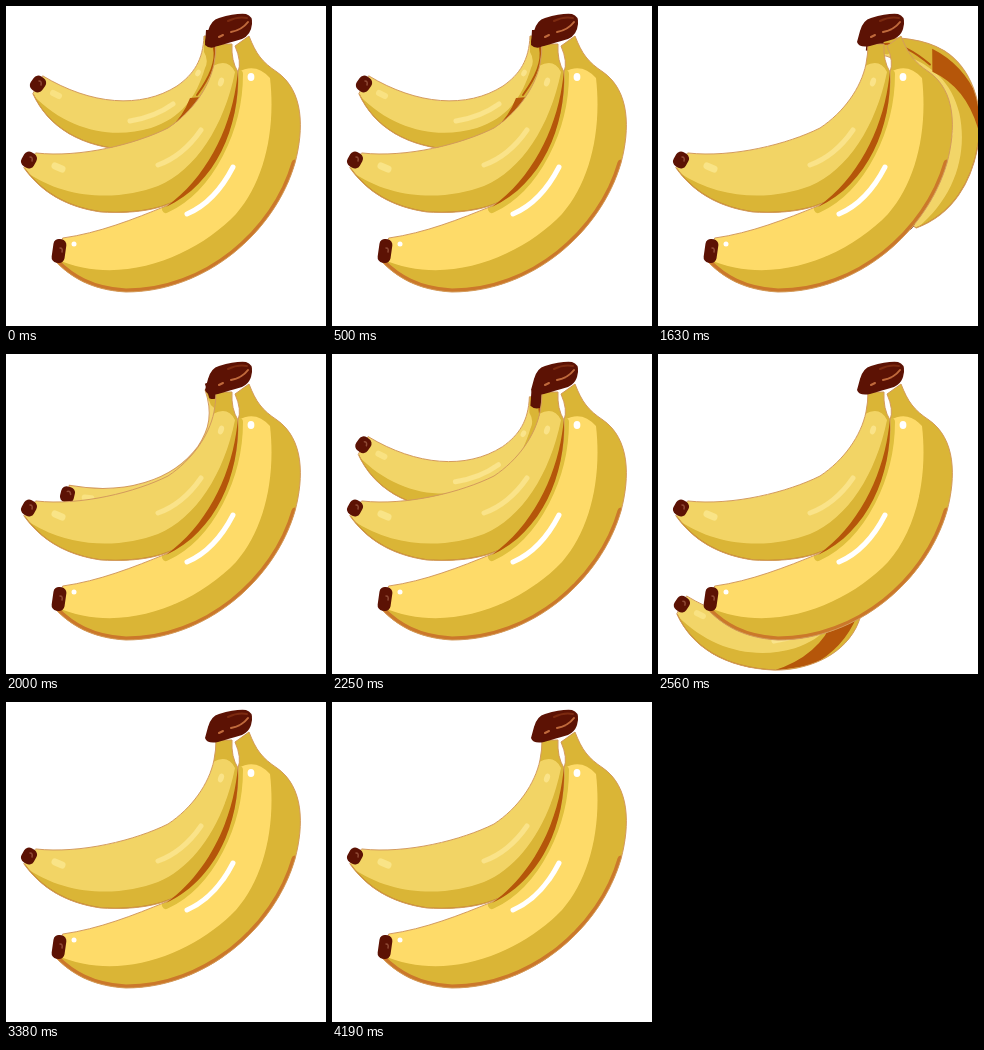
An HTML page for the animation above (4250 ms loop, 320 by 320 pixels).

```html
<!DOCTYPE html>
<html lang="en">
<head>
<meta charset="utf-8">
<title>Bananas</title>
<style>
html, body { margin: 0; width: 100%; height: 100%; overflow: hidden; background: #fff; }
svg { display: block; width: 100%; height: 100%; }
path { fill: none; stroke-linecap: round; }
</style>
</head>
<body>
<svg id="stage" viewBox="0 0 320 320"></svg>
<script>
const GOLD = '#dab536', BROWN = '#b5560a', DARK = '#5c1204';

const line = (d, color, width) => `<path d="${d}" style="stroke:${color};stroke-width:${width}"/>`;
const area = (d, color) => `<path d="${d}" style="fill:${color}"/>`;
const dot = (x, y, rx, ry, color, turn = 0) =>
  `<ellipse cx="${x}" cy="${y}" rx="${rx}" ry="${ry}" fill="${color}" transform="rotate(${turn} ${x} ${y})"/>`;

const tip = (x, y, w, h, turn) =>
  `<rect x="${x - w / 2}" y="${y - h / 2}" width="${w}" height="${h}" rx="5.5" fill="${DARK}" transform="rotate(${turn} ${x} ${y})"/>` +
  line(`M${x + 1} ${y - 3}Q${x + 4} ${y - 3} ${x + 3} ${y + 1}`, '#8f4a35', 1.5);

// A body with its shaded underside and details clipped to the outline
const banana = (id, outline, light, shade, inside, over) =>
  `<g id="${id}"><clipPath id="${id}Clip"><path d="${outline}"/></clipPath>
  <g clip-path="url(#${id}Clip)">${area(outline, light)}${area(shade, GOLD)}${inside}</g>
  ${line(outline, '#d39a5c', 1)}${over}</g>`;

const back = banana('back',
  'M37 70C85 99 135 103 171 80C188 68 197 54 198 30L213 30C216 55 217 80 206 102C190 132 155 144 125 144C75 142 42 121 27 88Z',
  '#f2d568',
  'M26 88C60 124 105 134 145 122C175 112 190 92 199 62Q203 54 198 46V30H230V160H20Z',
  area('M184 92L207 90Q194 122 162 139L122 145Q170 130 184 92Z', BROWN) +
  line('M125 144C75 142 42 121 27 88', '#c58a2c', 1.5),
  line('M208 42Q212 60 191 89', BROWN, 2) +
  line('M124 115Q149 111 167 98', '#fae48b', 5) +
  line('M47 87L53 90', '#f9e282', 6) +
  dot(192, 67, 2.5, 3.5, '#fae48b', 30) +
  area('M200 24L214 24L212 40Q204 44 199 39Z', DARK) +
  tip(32, 78, 14, 16, 35));

const middle = banana('middle',
  'M30 147C75 152 130 138 162 122C186 106 203 82 208 58Q210 48 210 38L226 38Q225 55 232 66C236 120 215 165 190 182C165 204 130 208 95 206C60 201 35 186 18 162Z',
  '#f2d465',
  'M16 163C60 196 115 194 152 180C190 164 218 120 229 66Q222 52 207 60L200 30H245V220H10Z',
  line('M190 182C165 204 130 208 95 206C60 201 35 186 18 162', '#c58a2c', 1.5),
  line('M152 159Q177 150 195 124', '#fae389', 5) +
  line('M49 160L56 163', '#f9e487', 7) +
  dot(215, 76, 2.8, 4.5, '#fae389', 20) +
  tip(23, 154, 14, 16, 30));

const front = banana('front',
  'M57 232C93 227 128 213 160 200C205 180 234 120 232 66Q236 56 229 40L243 30C250 48 256 56 271 66C298 85 298 123 289 157C269 226 200 286 120 286C85 284 65 271 50 256Z',
  '#fedb69',
  'M50 253C115 282 190 250 230 208C258 176 270 125 264 72Q250 56 232 66L220 25H310V300H40Z',
  line('M160 203C205 182 233 122 233 68', '#e0bf3c', 8) +
  line('M289 157C269 226 200 286 120 286C85 284 65 271 50 256', '#cb782a', 7),
  area('M232 66C234 120 210 178 160 201C200 172 223 125 230 80Z', BROWN) +
  line('M181 208Q209 196 227 161', '#fff', 5) +
  dot(245, 71, 3.4, 4, '#fff') + dot(68, 238, 2.5, 2.5, '#fff') +
  tip(53, 245, 13, 24, 8));

const crown =
  area('M199 36L202 25Q205 14 213 12Q230 7 240 8Q247 10 246 18Q245 29 236 33Q222 37 212 40Q201 42 199 36Z', DARK) +
  line('M213 31L217 29', '#c06a3c', 2) +
  line('M225 26Q236 24 242 16', '#c06a3c', 2) +
  line('M222 15Q232 10 241 12', '#7c2a10', 2);

document.getElementById('stage').innerHTML = back + middle + front + crown;
const mover = document.getElementById('back');

const LOOP = 4250, STEP = 62.5;
const SWING_MID = 1525, SWING_HALF = 700, SWING_ANGLE = 90;
const FALL_START = SWING_MID + SWING_HALF;

function draw(now) {
  const t = Math.floor((now % LOOP + 4) / STEP) * STEP;
  const phase = Math.min(1, Math.abs(t - SWING_MID) / SWING_HALF);
  const angle = -SWING_ANGLE * (1 + Math.cos(Math.PI * phase)) / 2;
  const fall = Math.max(0, t - FALL_START);
  mover.setAttribute('transform',
    `translate(${-0.024 * fall} ${0.51 * fall}) rotate(${angle} 215 30)`);
  mover.style.display = fall > 700 ? 'none' : '';
}

const start = performance.now();
function tick() {
  draw(performance.now() - start);
  requestAnimationFrame(tick);
}
tick();
</script>
</body>
</html>
```
